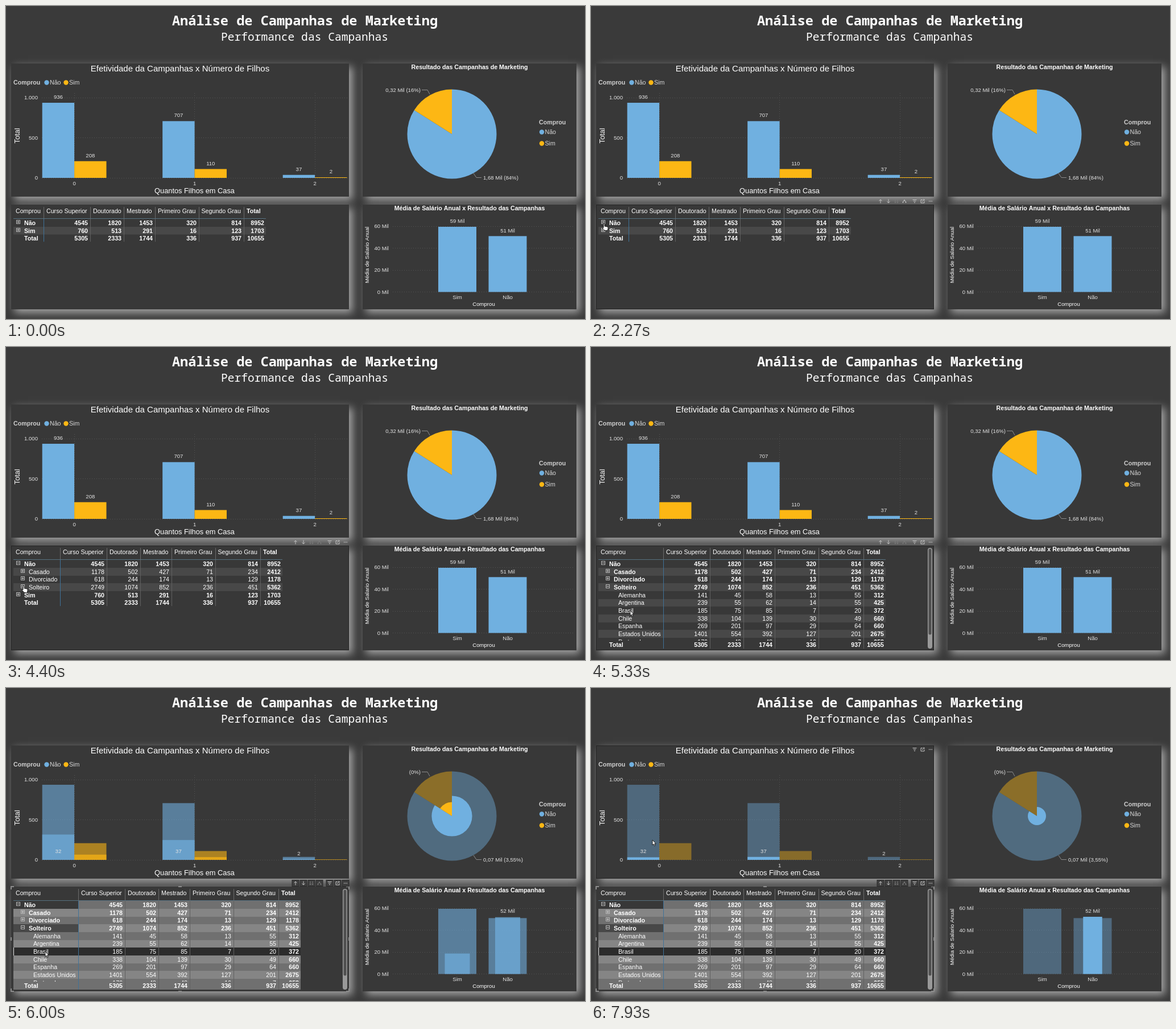
Write an HTML page with a canvas that moves like this. It is 1018 px wide and 550 px high and loops after 8000 ms.

```html
<!DOCTYPE html>
<html lang="pt">
<head>
<meta charset="utf-8">
<title>Análise de Campanhas</title>
<style>
html, body { margin: 0; width: 100%; height: 100%; overflow: hidden; background: #3a3a3a; }
canvas { display: block; width: 1018px; height: 550px; }
</style>
</head>
<body>
<canvas width="1018" height="550"></canvas>
<script>
const c = document.querySelector('canvas').getContext('2d');
const LOOP = 8000, FPS = 15;
const BLUE = '#70b0e0', GOLD = '#fdb714', BG = '#3a3a3a', PANEL = '#383838';
const SANS = '"Liberation Sans", Arial, sans-serif';
const MONO = '"Noto Sans Mono", "DejaVu Sans Mono", monospace';
const SMALL = 9.6, BODY = 10.67;
const EXPAND_1 = 2460, EXPAND_2 = 4460, SELECT = 5795, FADE = 5857;

const panels = {
  columns: [9, 101, 594, 234],
  pie: [627, 101, 376, 234],
  table: [9, 349, 594, 184],
  bars: [627, 349, 376, 184]
};

// ---- drawing helpers ----
function text(s, x, cy, size = BODY, { bold, align = 'left', color = '#fff', font = SANS } = {}) {
  c.font = `${bold ? 'bold ' : ''}${size}px ${font}`;
  c.textAlign = align;
  c.fillStyle = color;
  c.fillText(s, x, Math.round(cy + size * .36));
}
function rect(x, y, w, h, color, alpha = 1) {
  c.globalAlpha = alpha;
  c.fillStyle = color;
  c.fillRect(x, y, w, h);
  c.globalAlpha = 1;
}
function line(points, color, width = 1, dash = []) {
  c.beginPath();
  for (let i = 0; i < points.length; i += 2) c.lineTo(points[i], points[i + 1]);
  c.strokeStyle = color;
  c.lineWidth = width;
  c.setLineDash(dash);
  c.stroke();
  c.setLineDash([]);
}
function dot(x, y, r, color) {
  c.beginPath();
  c.arc(x, y, r, 0, 7);
  c.fillStyle = color;
  c.fill();
}
function vertical(s, x, y, size) {
  c.save();
  c.translate(x, y);
  c.rotate(-Math.PI / 2);
  text(s, 0, 0, size, { align: 'center' });
  c.restore();
}
const grid = points => line(points, '#555', 1, [1, 3]);
const label = (s, x, y, align = 'center') => text(s, x, y, SMALL, { align, color: '#e2e2e2' });
const mix = (a, b, p) => a + (b - a) * p;

function fadeProgress(t) {
  const u = Math.min(1, Math.max(0, (t - FADE) / 250));
  return u < .5 ? 4 * u ** 3 : 1 - 4 * (1 - u) ** 3;
}

// ---- pointer: time, x, y ----
const path = [
  [60, 1005, 546], [300, 800, 528], [600, 330, 515], [870, 66, 526], [930, 59, 525],
  [1200, 22, 455], [1470, 13, 378], [1670, 20, 383], [1870, 21, 382],
  [2735, 21, 382], [2930, 83, 396], [3270, 29, 419], [4800, 29, 419],
  [5070, 87, 438], [5330, 69, 463], [7000, 69, 463], [7070, 75, 449],
  [7470, 98, 360], [7870, 109, 268], [7930, 108, 267], [LOOP, 108, 267]
];
function pointer(t) {
  if (t < path[0][0]) return null;
  const i = path.findIndex(k => k[0] >= t);
  const [t0, x0, y0] = path[Math.max(0, i - 1)], [t1, x1, y1] = path[i];
  const p = t1 > t0 ? (t - t0) / (t1 - t0) : 0;
  return { x: mix(x0, x1, p), y: mix(y0, y1, p) };
}
function drawPointer({ x, y }, hand) {
  const shape = new Path2D(hand
    ? 'M1 1Q2-.5 3 1V5L8 6Q9.5 6.500 9 9L8 12.500H3L-1 8Q-1.500 6.500 1 7.500Z'
    : 'M0 0V9L2 7.200L3.500 10.500L5 9.900L3.600 6.700H6.200Z');
  c.save();
  c.translate(x, y);
  c.fillStyle = '#fff';
  c.strokeStyle = '#111';
  c.lineWidth = .9;
  c.fill(shape);
  c.stroke(shape);
  c.restore();
}

// ---- visual header icons ----
function icon(kind, x, y, dim) {
  const color = dim ? '#7c7c7c' : '#c4c4c4';
  const draw = (...p) => line(p.map((v, i) => v + (i % 2 ? y : x)), color);
  if (kind === 'up') { draw(0, 3.5, 0, -3); draw(-2.5, -.5, 0, -3, 2.5, -.5); }
  if (kind === 'down') { draw(0, -3.5, 0, 3); draw(-2.5, .5, 0, 3, 2.5, .5); }
  if (kind === 'double') for (const d of [-2, 2]) {
    draw(d, -3.5, d, 3);
    draw(d - 1.3, 1.5, d, 3, d + 1.3, 1.5);
  }
  if (kind === 'fork') { draw(0, -3, 0, 0); draw(-2.5, 3, -2.5, 1, 0, -2, 2.5, 1, 2.5, 3); draw(-3.5, 2, -1.5, 2); draw(1.5, 2, 3.5, 2); }
  if (kind === 'filter') { draw(-3.5, -2.5, 3.5, -2.5); draw(-2.2, 0, 2.2, 0); draw(-1, 2.5, 1, 2.5); }
  if (kind === 'focus') { draw(0, -2.5, -3, -2.5, -3, 3, 3, 3, 3, 0); draw(-1, 1, 3, -3); draw(1, -3, 3, -3, 3, -1); }
  if (kind === 'more') for (const d of [-2.4, 0, 2.4]) dot(x + d, y, .8, color);
}
function toolbar(name, t, boxed) {
  const [px, py, w] = panels[name];
  const y = name === 'columns' || name === 'pie' ? py + 7 : py - 6;
  const items = [['more', 6], ['focus', 20], ['filter', 34]];
  if (name === 'table') items.push(['fork', 52], ['double', 66], ['down', 80], ['up', 94]);
  for (const [kind, dx] of items) {
    const x = px + w - dx;
    if (boxed) {
      rect(x - 6.5, y - 6, 13, 12, '#2b2b2b');
      rect(x - 5.5, y - 5, 11, 10, '#3e3e3e');
    }
    icon(kind, x, y, kind === 'double' || kind === 'fork' && t >= EXPAND_1);
  }
}

// ---- visuals ----
function panel([x, y, w, h]) {
  c.save();
  c.shadowColor = '#a8a8a8';
  c.shadowBlur = 14;
  c.shadowOffsetX = c.shadowOffsetY = 6;
  rect(x, y, w, h, PANEL);
  c.restore();
}

function columnChart(p, faded) {
  text('Efetividade da Campanhas x Número de Filhos', 306, 110, 15, { align: 'center' });
  text('Comprou', 13, 134, BODY, { bold: true, color: '#d0d0d0' });
  dot(71.5, 134.5, 4.2, BLUE);
  text('Não', 77, 134, BODY, { color: '#d8d8d8' });
  dot(105.5, 134.5, 4.2, GOLD);
  text('Sim', 111, 134, BODY, { color: '#d8d8d8' });
  vertical('Total', 19, 228, 12.8);
  text('Quantos Filhos em Casa', 331.5, 324.7, 12.8, { align: 'center' });

  const base = 302, scale = .141;
  for (const [v, s] of [[0, '0'], [500, '500'], [1000, '1.000']]) {
    const y = base - v * scale;
    grid([63, Math.floor(y) + .5, 600, Math.floor(y) + .5]);
    label(s, 56, y, 'right');
  }
  const data = [[936, 208, 32], [707, 110, 37], [37, 2, 2]];
  data.forEach(([no, yes, picked], i) => {
    const x = 63.7 + i * 211.5;
    grid([Math.floor(x + 56.5) + .5, 153, Math.floor(x + 56.5) + .5, base]);
    label(i, x + 56.5, 311.5);
    [[no, BLUE, picked], [yes, GOLD, 0]].forEach(([v, color, goal], j) => {
      const h = Math.max(v * scale, 1), bx = x + j * 56.4;
      rect(bx, base - h, 56.4, h, color, 1 - .6 * p);
      if (faded) {
        const part = mix(v, goal, p) * scale;
        rect(bx, base - part, 56.4, part, color, p);
      } else label(v, bx + 28.2, base - h - 10.3);
    });
    if (faded) label(picked, x + 28.2, i < 2 ? 287 - i * .5 : 291);
  });
}

function pieChart(p, faded) {
  text('Resultado das Campanhas de Marketing', 815, 107.5, BODY, { bold: true, align: 'center' });
  const x = 784, y = 225, r = 78.5, top = -Math.PI / 2, split = top + Math.PI * 2 * .84;
  const slice = (a, b, radius, color, alpha) => {
    c.globalAlpha = alpha;
    c.beginPath();
    c.moveTo(x, y);
    c.arc(x, y, radius, a, b);
    c.fillStyle = color;
    c.fill();
    c.globalAlpha = 1;
  };
  const both = (rNo, rYes, alpha) => {
    slice(top, split, rNo, BLUE, alpha);
    slice(split, top + Math.PI * 2, rYes, GOLD, alpha);
  };
  both(r, r, faded ? .42 : 1);
  if (faded) both(mix(r, 16, p), mix(r, 0, p), 1);
  line([731, 147.5, 741, 147.5, 745, 155], '#8c8c8c');
  line([822, 294, 827, 301.5, 836, 301.5], '#8c8c8c');
  label(faded ? '(0%)' : '0,32 Mil (16%)', 729, 147.5, 'right');
  label(faded ? '0,07 Mil (3,55%)' : '1,68 Mil (84%)', 839, 302, 'left');
  text('Comprou', 937, 204.5, BODY, { bold: true, color: '#d0d0d0' });
  dot(942, 221.5, 4.2, BLUE);
  text('Não', 947.5, 221, BODY, { color: '#d8d8d8' });
  dot(942, 241.5, 4.2, GOLD);
  text('Sim', 947.5, 241, BODY, { color: '#d8d8d8' });
}

function barChart(p, faded) {
  text('Média de Salário Anual x Resultado das Campanhas', 815, 355, BODY, { bold: true, align: 'center' });
  vertical('Média de Salario Anual', 635, 437.5, SMALL);
  text('Comprou', 840, 524, SMALL, { align: 'center' });
  const base = 502.5, scale = 1.925;
  for (let v = 0; v <= 60; v += 20) {
    const y = base - v * scale;
    grid([680, Math.floor(y) + .5, 1000, Math.floor(y) + .5]);
    label(v + ' Mil', 673, y, 'right');
  }
  [['Sim', 59.5, '59 Mil', 0, 760], ['Não', 51, '51 Mil', 52.2, 848.5]].forEach(([name, v, s, goal, x]) => {
    const w = 67, h = v * scale, mid = x + w / 2;
    rect(x, base - h, w, h, BLUE, 1 - .6 * p);
    if (faded) {
      const part = mix(v, goal, p) * scale, pw = w * (1 - p / 2);
      rect(mid - pw / 2, base - part, pw, part, BLUE, p);
    }
    label(name, mid, 512);
    if (!faded) label(s, mid, base - h - 10);
    else if (goal) label('52 Mil', mid, 392);
  });
}

// level, name, values
const rows = {
  no: [0, 'Não', '4545 1820 1453 320 814 8952'],
  yes: [0, 'Sim', '760 513 291 16 123 1703'],
  status: [
    [1, 'Casado', '1178 502 427 71 234 2412'],
    [1, 'Divorciado', '618 244 174 13 129 1178'],
    [1, 'Solteiro', '2749 1074 852 236 451 5362']
  ],
  countries: [
    [2, 'Alemanha', '141 45 58 13 55 312'],
    [2, 'Argentina', '239 55 62 14 55 425'],
    [2, 'Brasil', '185 75 85 7 20 372'],
    [2, 'Chile', '338 104 139 30 49 660'],
    [2, 'Espanha', '269 201 97 29 64 660'],
    [2, 'Estados Unidos', '1401 554 392 127 201 2675'],
    [2, 'Portugal', '176 49 48 16 7 258']
  ]
};
const TOTALS = '5305 2333 1744 336 937 10655';
const heads = [['Curso Superior', 71], ['Doutorado', 153], ['Mestrado', 212], ['Primeiro Grau', 267], ['Segundo Grau', 343.5], ['Total', 423]];
const ends = [144, 203, 258, 335, 414, 454];
const seps = [66.5, 148.5, 207.5, 262.5, 339.5, 418.5];

function expander(x, y, open) {
  c.strokeStyle = '#b8b8b8';
  c.lineWidth = 1;
  c.strokeRect(x - 3, y - 3, 6, 6);
  line([x - 2, y, x + 2, y], '#d0d0d0');
  if (!open) line([x, y - 2, x, y + 2], '#d0d0d0');
}

function table(t) {
  const depth = t >= EXPAND_2 ? 2 : t >= EXPAND_1 ? 1 : 0;
  const selected = t >= SELECT;
  const off = [0, 29, 61][depth], right = 457 + off, step = 13.67;
  const list = [rows.no, ...(depth ? rows.status : []), ...(depth > 1 ? rows.countries : [rows.yes])];
  const end = depth > 1 ? 516 : 374.2 + list.length * step;
  const totalY = depth > 1 ? 523 : 381 + list.length * step;
  const bottom = depth > 1 ? 530 : end + step - 1;
  const values = (s, y, bold) => s.split(' ').forEach((v, i) =>
    text(v, ends[i] + off, y, BODY, { bold: bold || i === 5, align: 'right' }));

  c.save();
  c.beginPath();
  c.rect(10, 374, 580, end - 374);
  c.clip();
  list.forEach(([level, name, nums], i) => {
    const y = 381 + i * step, top = Math.round(y - 6.8), h = Math.round(y + step - 6.8) - top;
    const band = i % 2, picked = selected && name === 'Brasil';
    const open = name === 'Não' && depth > 0 || name === 'Solteiro' && depth > 1;
    const parent = level === 0 || level === 1 && depth > 1;
    if (selected) rect(13, top, right - 13, h, picked ? '#2c2c2c' : band ? '#858585' : '#707070');
    else if (band) rect(13, top, right - 13, h, '#484848');
    if (selected && open) rect(13, top, seps[0] + off - 13, h, band ? '#484848' : PANEL);
    if (picked) rect(13, top, 1, h, '#e4e4e4');
    if (level < 2) expander(21.5 + level * 8, Math.round(y - 2) + .5, open);
    text(name, 32 + level * 8, y, BODY, { bold: parent });
    values(nums, y, parent);
  });
  c.restore();

  if (selected) rect(13, end, right - 13, bottom - end, '#707070');
  text('Comprou', 17, 360, BODY);
  heads.forEach(([s, x], i) => text(s, x + off, 360, BODY, { bold: i === 5 }));
  text('Total', 32, totalY, BODY, { bold: true });
  values(TOTALS, totalY, true);
  line([13, 373.5, right, 373.5], '#56707f');
  seps.forEach((x, i) => {
    line([x + off, 353, x + off, 373], '#6a6a6a');
    line([x + off, 374, x + off, bottom], i ? '#606060' : '#3f7299');
  });

  if (depth > 1) {
    c.beginPath();
    c.roundRect(592, 353, 8, 177, 4);
    c.fillStyle = '#999';
    c.fill();
    c.beginPath();
    c.roundRect(593.5, 354.5, 5, 151, 2.5);
    c.fillStyle = '#505050';
    c.fill();
  }
}

function selectionHandles() {
  const [x, y, w, h] = panels.table, color = '#8c8c8c';
  for (const sx of [0, 1]) for (const sy of [0, 1]) {
    const px = x + sx * w, py = y + sy * h, dx = sx ? -5 : 5, dy = sy ? -5 : 5;
    line([px + dx, py, px, py, px, py + dy], color, 2);
  }
  for (const py of [y, y + h]) line([x + w / 2 - 3, py, x + w / 2 + 3, py], color, 2);
  for (const px of [x, x + w]) line([px, y + h / 2 - 3, px, y + h / 2 + 3], color, 2);
}

function draw(t) {
  const p = fadeProgress(t), faded = t >= FADE, selected = t >= SELECT;
  const at = pointer(t);
  rect(0, 0, 1018, 550, BG);
  text('Análise de Campanhas de Marketing', 525.5, 25.5, 23.6, { bold: true, align: 'center', font: MONO });
  text('Performance das Campanhas', 525, 53.5, 19.6, { align: 'center', font: MONO });
  Object.values(panels).forEach(panel);

  const hovered = at && Object.keys(panels).find(k => {
    const [x, y, w, h] = panels[k];
    return at.x >= x && at.x <= x + w && at.y >= y && at.y <= y + h;
  });
  const plainHover = hovered && !(selected && hovered === 'table');
  if (plainHover) {
    const [x, y, w, h] = panels[hovered];
    c.strokeStyle = '#242424';
    c.lineWidth = 1;
    c.strokeRect(x + .5, y + .5, w - 1, h - 1);
  }
  columnChart(p, faded);
  pieChart(p, faded);
  barChart(p, faded);
  table(t);
  if (selected) {
    selectionHandles();
    toolbar('table', t, true);
  }
  if (plainHover) toolbar(hovered, t);
  if (at) drawPointer(at, t >= 1860 && t < 2790 || t >= 3990 && t < 4860);
}

const start = performance.now();
function tick() {
  const t = (performance.now() - start) % LOOP;
  const step = Math.floor((t + 4) * FPS / 1000);
  draw(Math.min(LOOP, step * 1000 / FPS));
  requestAnimationFrame(tick);
}
tick();
</script>
</body>
</html>
```
